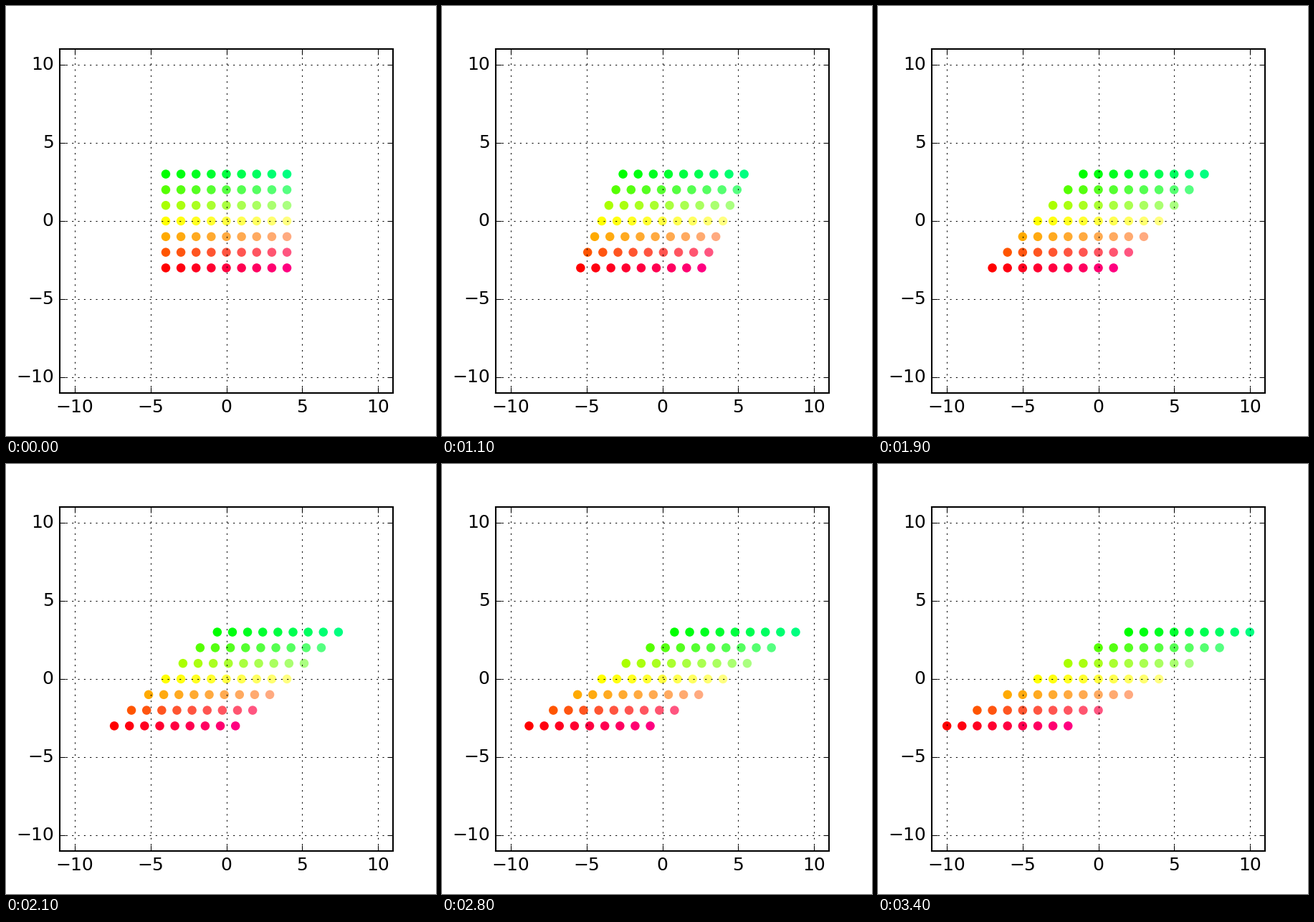
A matplotlib script for the animation above (3.9 s loop, 600 by 600 pixels).

```python
import numpy as np
import matplotlib.pyplot as plt
from matplotlib.animation import FuncAnimation

plt.style.use("classic")
plt.rcParams.update({
    "font.family": "DejaVu Sans",
    "figure.facecolor": "white",
    "savefig.dpi": "figure",
})

HOLD = 5          # still frames at either end
STEPS = 30        # shear steps
MAX_SHEAR = 2.0
INTERVAL = 100    # ms
FRAMES = STEPS - 1 + 2 * HOLD


def dot_color(x, y):
    return min(1, 1 - y / 3), min(1, 1 + y / 3), 1 / 4 + x / 16


def sheared(shear):
    return np.column_stack([xs + shear * ys, ys])


grid_x, grid_y = np.meshgrid(np.arange(-4, 5), np.arange(-3, 4))
xs, ys = grid_x.ravel(), grid_y.ravel()
colors = [dot_color(x, y) for x, y in zip(xs, ys)]

fig, ax = plt.subplots(figsize=(4, 4), dpi=150)
dots = ax.scatter(xs, ys, s=36, c=colors, edgecolors="none")
ax.set(xlim=(-11, 11), ylim=(-11, 11),
       xticks=range(-10, 11, 5), yticks=range(-10, 11, 5))
ax.grid(True)


def update(frame):
    step = np.clip(frame - HOLD + 1, 0, STEPS)
    dots.set_offsets(sheared(MAX_SHEAR * step / STEPS))
    return (dots,)


anim = FuncAnimation(fig, update, frames=FRAMES, interval=INTERVAL,
                     repeat=True, repeat_delay=0, blit=False)
plt.show()
```
